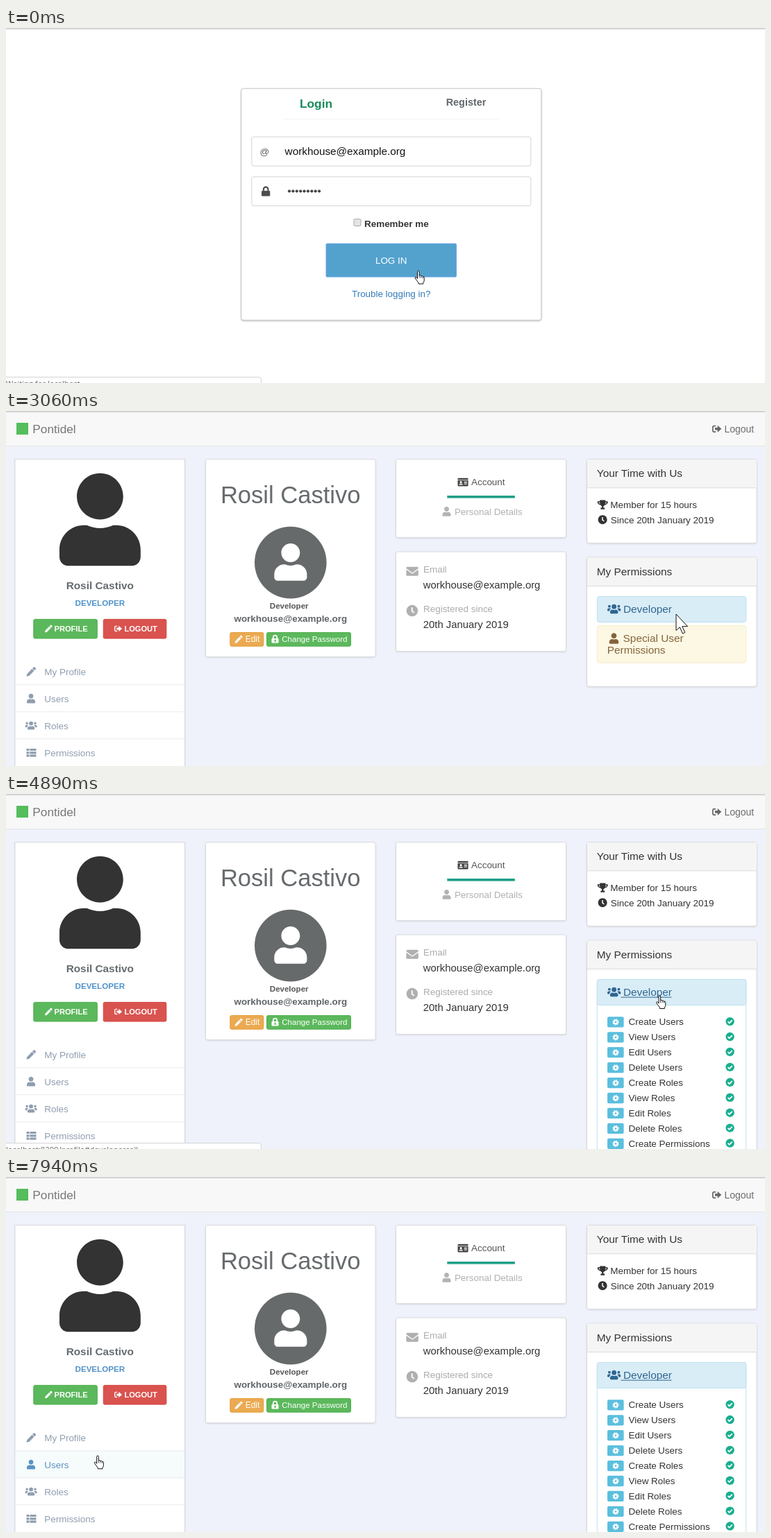
An HTML page for the animation above (8 s loop, 1093 by 512 pixels).

```html
<!DOCTYPE html>
<html lang="en">
<head>
<meta charset="utf-8">
<title>Login and profile</title>
<style>
html, body { margin: 0; width: 100%; height: 100%; overflow: hidden; background: #fff }
svg { display: block; width: 1093px; height: 512px; font-family: "Liberation Sans", Arial, sans-serif }
.card { fill: #fff; stroke: #d9dadd; filter: drop-shadow(0 1px 1px rgba(0,0,0,.1)) }
.status { font-family: "Open Sans", "Noto Sans", sans-serif }
</style>
</head>
<body>
<svg id="stage" viewBox="0 0 1093 512"></svg>
<script>
const LOOP = 8000, MAIL = 'workhouse@example.org', NAME = 'Rosil Castivo', BRAND = 'Pontidel';

const text = (x, y, size, s, fill, more = '') =>
  `<text x="${x}" y="${y}" font-size="${size}" fill="${fill}" ${more}>${s}</text>`;
const BOLD = 'font-weight="700"', MID = 'text-anchor="middle"';
const rect = (x, y, w, h, fill, more = '') =>
  `<rect x="${x}" y="${y}" width="${w}" height="${h}" fill="${fill}" ${more}/>`;
const box = (x, y, w, h, fill, stroke, r = 3) => rect(x, y, w, h, fill, `stroke="${stroke}" rx="${r}"`);
const card = (x, y, w, h, r = 3) => `<rect class="card" x="${x}" y="${y}" width="${w}" height="${h}" rx="${r}"/>`;
const path = (d, more = '') => `<path d="${d}" ${more}/>`;
const group = (id, s) => `<g id="${id}">${s}</g>`;

// Icons are drawn on a grid 512 units high.
const wing = 'M0 288q0-64 64-64h64q27 0 45 18-66 36-75 110H32q-32 0-32-32z';
const side = '<circle cx="96" cy="128" r="64"/>' + path(wing);
const icons = {
  user: path('M224 256c70.7 0 128-57.3 128-128S294.7 0 224 0 96 57.3 96 128s57.3 128 128 128zm89.6 32h-16.7c-22.2 10.2-46.9 16-72.9 16s-50.6-5.8-72.9-16h-16.7C60.2 288 0 348.2 0 422.4V464c0 26.5 21.5 48 48 48h352c26.5 0 48-21.5 48-48v-41.6c0-74.2-60.2-134.4-134.4-134.4z'),
  users: side + `<g transform="matrix(-1 0 0 1 640 0)">${side}</g><circle cx="320" cy="144" r="112"/>` +
    path('M128 432v-29c0-63 51-115 115-115q77 34 154 0c64 0 115 52 115 115v29q0 48-48 48H176q-48 0-48-48z'),
  pencil: path('M0 512l28-128L290 112l110 110-262 262zM312 90l60-60q34-34 68 0l42 42q34 34 0 68l-60 60z'),
  exit: path('M150 190h140V70l210 186-210 186V322H150zM190 64H100Q0 64 0 160v192q0 96 100 96h90v-64H96q-32 0-32-32V160q0-32 32-32h94z'),
  idcard: path('M48 32h480q48 0 48 48v352q0 48-48 48H48q-48 0-48-48V80q0-48 48-48zM0 112h576v36H0zM176 192a60 60 0 1 0 .1 0zM70 400q0-70 60-70h92q60 0 60 70zM350 210h160v34H350zM350 280h160v34H350zM350 350h160v34H350z', 'fill-rule="evenodd"'),
  mail: path('M48 64h416q48 0 48 48v20L256 310 0 132v-20q0-48 48-48zM0 180v220q0 48 48 48h416q48 0 48-48V180L256 358z'),
  clock: path('M256 8a248 248 0 1 0 .1 0zM222 110h58v150l80 60-32 42-106-76z', 'fill-rule="evenodd"'),
  trophy: path('M130 0h316v64h130v76q0 90-176 145-30 45-70 60v85h70v82H176v-82h70v-85q-40-15-70-60Q0 230 0 140V64h130zM64 128q6 52 76 82l-10-82zM512 128q-6 52-76 82l10-82z', 'fill-rule="evenodd"'),
  lock: path('M48 224h352q48 0 48 48v192q0 48-48 48H48q-48 0-48-48V272q0-48 48-48z') +
    path('M104 224v-72a120 120 0 0 1 240 0v72', 'fill="none" stroke="currentColor" stroke-width="80"'),
  list: [40, 198, 356].map(y => path(`M0 ${y}h148v116H0zM180 ${y}h332v116H180z`)).join(''),
  cog: '<g fill="none" stroke="#fff"><circle cx="256" cy="256" r="135" stroke-width="120"/>' +
    '<circle cx="256" cy="256" r="215" stroke-width="80" pathLength="16" stroke-dasharray="1"/></g>',
  check: '<circle cx="256" cy="256" r="252"/>' +
    path('M130 262l88 88 168-172', 'fill="none" stroke="#fff" stroke-width="72"'),
};
const icon = (name, x, y, size, color, more = '') =>
  `<g transform="translate(${x} ${y}) scale(${size / 512})" fill="${color}" color="${color}" ${more}>${icons[name]}</g>`;

const loginPage = () => {
  let s = rect(0, 0, 1093, 512, '#fff') + rect(0, 0, 1093, 2, '#d3d3d5');
  s += `<rect x="338.8" y="87.3" width="432" height="334" rx="3" fill="#fff" stroke="#c9c9cb" style="filter:drop-shadow(0 1.5px 1px rgba(0,0,0,.25))"/>`;
  s += rect(400, 131, 310, 1, '#f4f4f4');
  s += text(446.5, 115, 17.28, 'Login', '#178a5c', BOLD + MID.padStart(22));
  s += text(662.5, 112, 14.4, 'Register', '#60676b', BOLD + MID.padStart(22));
  s += box(353.8, 157, 402, 42, '#fff', '#d2d4d7') + box(353.8, 214.7, 402, 41.8, '#fff', '#d2d4d7');
  s += text(365.4, 183.2, 13.44, '@', '#555') + text(401.6, 183, 15.3, MAIL, '#111');
  s += icon('lock', 368, 228.5, 14, '#4c4c4c');
  for (let i = 0; i < 9; i++) s += `<circle cx="${408 + i * 5.38}" cy="235.3" r="2.1" fill="#444"/>`;
  s += box(501, 275.5, 10, 10, '#e4e4e4', '#a9a9a9', 1.5);
  s += text(516, 287, 13.44, 'Remember me', '#333', BOLD);
  s += box(461, 311, 187.5, 48, '#53a2ce', '#6aa5e8', 1.5);
  s += text(554.7, 340, 13.44, 'LOG IN', '#fff', MID);
  return s + text(554.7, 387.5, 13.4, 'Trouble logging in?', '#337ab7', MID);
};

const sidebar = () => {
  let s = card(13, 69.5, 244.5, 460, 0) + icon('user', 77, 89.7, 133.5, '#333');
  s += text(135.3, 257, 15.36, NAME, '#666c70', BOLD + ' ' + MID);
  s += text(135.3, 280.6, 11.6, 'DEVELOPER', '#4f92c8', BOLD + ' ' + MID);
  s += box(39.8, 300.4, 91.5, 27.6, '#5cb85c', '#4cae4c', 2) + icon('pencil', 56, 308.3, 11, '#fff');
  s += text(69.5, 318, 11.1, 'PROFILE', '#fff', BOLD);
  s += box(140.3, 300.4, 90.5, 27.6, '#d9534f', '#d43f3a', 2) + icon('exit', 156, 308.3, 11.3, '#fff');
  s += text(170.4, 318, 11.1, 'LOGOUT', '#fff', BOLD);
  s += group('hover', rect(13.5, 395, 243.5, 39, '#f6fbfc'));
  const rows = [['pencil', 29.5, 14, 'My Profile'], ['user', 30, 13.8, 'Users'],
    ['users', 27.6, 13.6, 'Roles'], ['list', 29.5, 14, 'Permissions']];
  rows.forEach(([name, x, size, label], i) => {
    const y = 375.8 + i * 39;
    if (i) s += rect(13.5, y - 20.5, 243.5, 1, '#e9ebee');
    s += group('row' + i, icon(name, x, y - 7, size, 'currentColor') +
      text(55.3, y + 4.8, 13.44, label, 'currentColor'));
  });
  return `<g color="#8f9eaf">${s}</g>`;
};

const profileCards = () => {
  let s = card(287.5, 69.5, 244.5, 285) + text(409.7, 133, 34.56, NAME, '#666b6d', MID);
  s += '<circle cx="409.8" cy="218.6" r="51.8" fill="#666a6b"/>' + icon('user', 386.3, 191, 53.8, '#fff');
  s += text(407.7, 285.2, 11.52, 'Developer', '#555', BOLD + ' ' + MID);
  s += text(409.8, 304.2, 13.4, MAIL, '#5f6467', BOLD + ' ' + MID);
  s += box(322.8, 319.5, 48, 19.7, '#ebaa52', '#e49c36', 2) + icon('pencil', 329.5, 323.3, 11.5, '#fff');
  s += text(344.7, 333, 12, 'Edit', '#fff');
  s += box(375.5, 319.5, 121, 19.7, '#5cb85c', '#4cae4c', 2) + icon('lock', 382.5, 323, 11.5, '#fff');
  s += rect(386.6, 329.6, 2, 3.4, '#5cb85c') + text(397.3, 333, 11.52, 'Change Password', '#fff');

  s += card(561.5, 69.5, 245, 113) + icon('idcard', 650.5, 96, 13.4, '#444');
  s += text(670, 107.3, 13.44, 'Account', '#555') + rect(635.3, 122, 97.5, 3.6, '#1f9f88');
  s += icon('user', 628.5, 138, 13.8, '#b3b3b3') + text(645.9, 149.5, 13.44, 'Personal Details', '#aeb1b3');
  s += card(561.5, 203, 245, 143.5) + icon('mail', 576.4, 222.6, 17.4, '#b0b0b0') + icon('clock', 576.4, 279.6, 17, '#b0b0b0');
  s += text(601, 233, 13.44, 'Email', '#a9abad') + text(600.8, 256, 14.85, MAIL, '#333');
  s += text(601, 290, 13.44, 'Registered since', '#a9abad') + text(600.8, 313, 14.85, '20th January 2019', '#333');
  return s;
};

const header = (y, h, label) => rect(837, y, 243.7, h, '#f5f5f5') + rect(837, y + h, 243.7, 1, '#dcdcdc') +
  text(850.8, y + 25.3, 15.36, label, '#333');
const roleBox = box(851.3, 267.5, 214.5, 37, '#d9edf7', '#bce3ee');

const collapsed = () => card(836.5, 211, 244.5, 186.3) + header(211.5, 40.5, 'My Permissions') + roleBox +
  box(851.3, 309.7, 214.5, 53.5, '#fcf8e3', '#f8ecca') + icon('user', 868.7, 320.3, 15.4, '#85643c') +
  text(888.6, 333.4, 15.36, 'Special User', '#85643c') + text(865.8, 350, 15.36, 'Permissions', '#85643c');

const expanded = () => {
  let s = card(836.5, 211, 244.5, 330) + header(211.5, 40.5, 'My Permissions');
  s += box(851.3, 267.5, 214.5, 260, '#fff', '#bce3ee') + roleBox;
  for (let i = 0; i < 9; i++) {
    const y = 328.5 + i * 21.93;
    const label = ['Create', 'View', 'Edit', 'Delete'][i % 4] + ' ' + ['Users', 'Roles', 'Permissions'][i >> 2];
    s += rect(866, y - 7.3, 23.6, 15.3, '#5bbfdd', 'rx="2"') + icon('cog', 873.3, y - 4.2, 9.4, '#fff');
    s += text(896.5, y + 4.7, 13.44, label, '#333') + icon('check', 1036.3, y - 6.7, 12.6, '#1aae8f');
  }
  return s;
};

const profilePage = () => rect(0, 0, 1093, 512, '#eff2fa') + rect(0, 0, 1093, 50, '#f8f8f8') +
  rect(0, 0, 1093, 2, '#d3d3d5') + rect(0, 50, 1093, 1, '#e2e3e6') +
  rect(15, 17, 17, 17, '#55bd5c') + text(38.3, 32, 17.28, BRAND, '#777') +
  icon('exit', 1017, 19, 13.6, '#666') + text(1034.4, 31, 14, 'Logout', '#6d6d6d') +
  sidebar() + profileCards() +
  card(836.5, 69.5, 244.5, 121) + header(70, 40.3, 'Your Time with Us') +
  icon('trophy', 851.8, 128.5, 13.2, '#333') + text(870.3, 140, 13.44, 'Member for 15 hours', '#333') +
  icon('clock', 852.4, 150, 13.4, '#333') + text(870.8, 161.5, 13.44, 'Since 20th January 2019', '#333') +
  group('closed', collapsed()) + group('open', expanded()) +
  icon('users', 866, 277.8, 15.4, '#2f6690') + text(888.9, 291, 15.36, 'Developer', '#2f6690') +
  group('underline', rect(885.5, 292.6, 73, 1, '#2f6690'));

const statusBar = path('M-1 503.5H364q3.5 0 3.5 3.5V514H-1z', 'fill="#fff" stroke="#d4d4d6"') +
  text(0, 517, 11.2, '', '#666', 'id="message" class="status"');

const line = 'fill="#fff" stroke="#111" stroke-linejoin="round"';
const cursors =
  group('hand', path('M4 12V2a1.3 1.3 0 0 1 2.6 0V7.5q2-.8 2.6.7 2-.6 2.5.8 2-.3 2 1.5v4q0 2-1.4 3.5v1.5H5.5V18Q3 14.5.8 11.5q-.6-1.6.8-1.8 1 0 2.4 2.3z', line) +
    path('M6.6 7.5v3.5M9.2 8.2v3M11.7 9v2.5', 'stroke="#111" stroke-width=".8"')) +
  group('arrow', path('M0 0V23.5l5.4-4.8 4 9.3 3.4-1.5-4-8.8h7.7z', line)) +
  group('beam', path('M-4 1h2.5Q0 1 0 2.5v18Q0 22-1.5 22H-4M4 1H1.5Q0 1 0 2.5M0 20.5Q0 22 1.5 22H4', 'fill="none" stroke="#222" stroke-width="1.8"'));

document.getElementById('stage').innerHTML =
  group('profile', profilePage()) + group('login', loginPage()) + group('status', statusBar) + group('cursor', cursors);

// The pointer is sampled in steps: start time, shape, x, y.
const pointer = [
  [0, 'hand', 588.5, 349.5], [2260, 'beam', 711.3, 301.5], [2460, 'arrow', 880, 296], [2660, 'arrow', 973, 293],
  [3060, 'arrow', 965, 293], [3280, 'arrow', 950, 293], [3680, 'hand', 936.5, 290], [3880, 'hand', 936.5, 288],
  [4700, 'hand', 936.5, 289], [4890, 'hand', 936, 290], [5900, 'hand', 921, 290], [6100, 'arrow', 880, 295],
  [6300, 'arrow', 849.5, 301], [6520, 'arrow', 800, 318], [6720, 'arrow', 757, 335], [6920, 'arrow', 725, 346.5],
  [7120, 'arrow', 610, 362], [7320, 'arrow', 450, 381], [7520, 'arrow', 300, 391], [7720, 'hand', 175, 399],
  [7940, 'hand', 126.7, 401.3],
];

const el = id => document.getElementById(id);
const show = (id, on) => el(id).style.display = on ? '' : 'none';

function draw(now) {
  const t = now % LOOP;
  show('login', t < 1250);
  show('profile', t >= 1250);
  show('closed', t < 4100);
  show('open', t >= 4100);
  show('underline', t >= 3680);
  show('status', t < 1650 || t >= 4300 && t < 6720);
  el('message').textContent = t < 1650 ? 'Waiting for localhost...' : 'localhost:8200/profile#developercoll';
  show('hover', t >= 7720);
  el('row1').setAttribute('color', t >= 7720 ? '#5b93c4' : '#8f9eaf');
  const [, shape, x, y] = pointer.filter(p => p[0] <= t).pop();
  for (const id of ['hand', 'arrow', 'beam']) show(id, id === shape);
  el('cursor').setAttribute('transform', `translate(${x} ${y})`);
  requestAnimationFrame(draw);
}
draw(performance.now());
</script>
</body>
</html>
```
